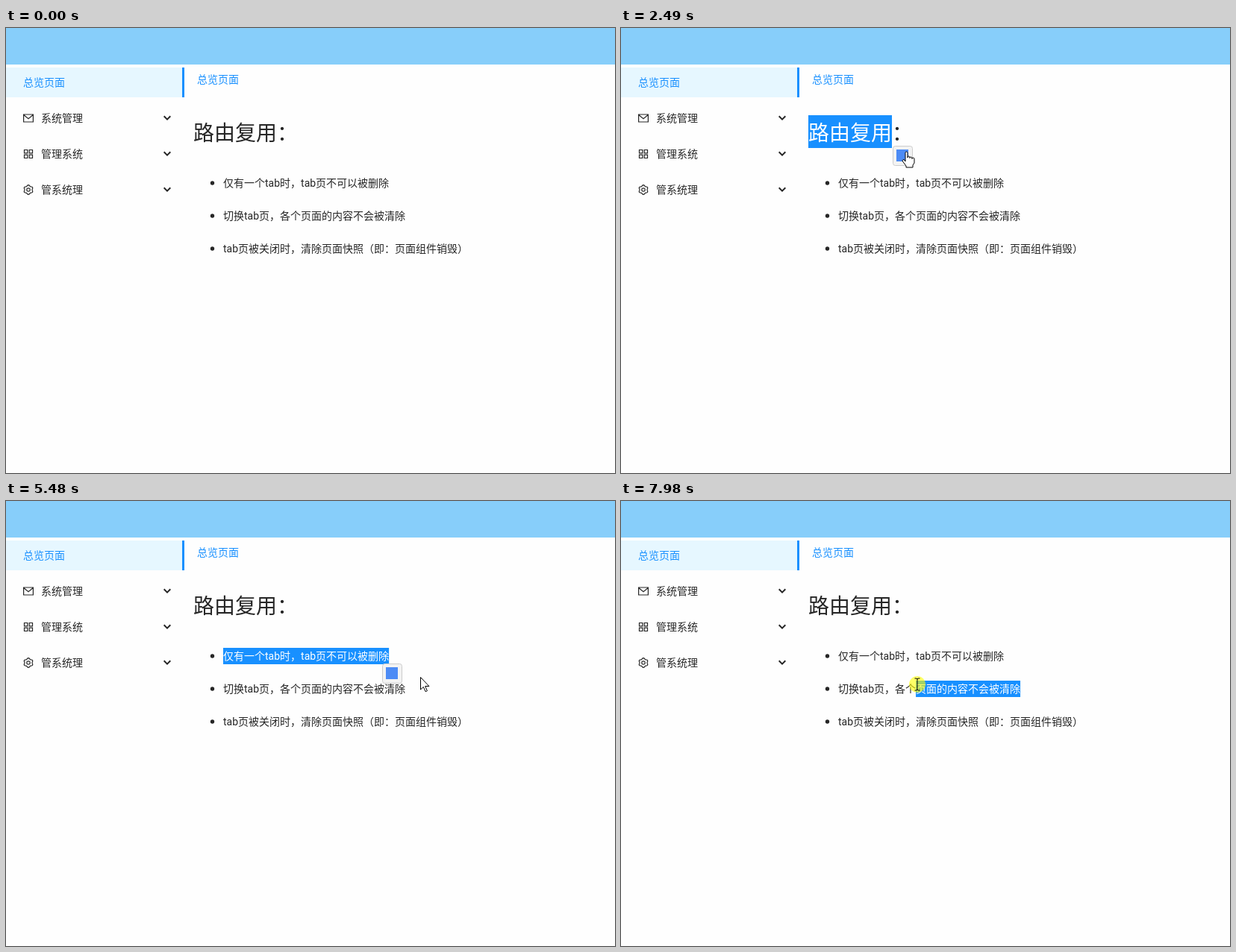
Recreate the animation shown at these times as an HTML page. Size 816x597 px, loop 8000 ms.

```html
<!DOCTYPE html>
<html lang="zh-CN">
<head>
<meta charset="utf-8">
<style>
  html, body { margin: 0; width: 100%; height: 100%; overflow: hidden; background: #fefefe; }
  svg { display: block; }
  text { font: 14px Roboto, "Noto Sans CJK SC", "Noto Sans CJK", sans-serif; fill: #262626; }
  .title { font-size: 28px; }
  .blue { fill: #1890ff; }
  .tab { font-weight: 500; }
  .white { fill: #fff; }
  .item { color: #262626; }
  .item.hover { color: #1890ff; }
  .item text { fill: currentColor; }
  .item path { fill: none; stroke: currentColor; stroke-width: 1.2; }
  .item .chevron { stroke-width: 2; }
</style>
</head>
<body>
<svg id="stage" width="816" height="597" viewBox="0 0 816 597">
  <rect width="816" height="49" fill="#87cefa"/>
  <rect y="53" width="239" height="40" fill="#e6f7ff"/>
  <rect x="236" y="53" width="3" height="40" class="blue"/>
  <text x="23" y="78" class="blue">总览页面</text>
  <text x="256" y="74" class="blue tab">总览页面</text>
  <g id="menu"></g>
  <g id="lines"></g>
  <g id="popup">
    <rect x=".5" y=".5" width="26" height="26" rx="3" fill="#f3f3f3" stroke="#ccc"/>
    <rect x="5" y="5" width="16" height="16" fill="#4c8bf5"/>
  </g>
  <circle id="ring" r="11" fill="#ff0" fill-opacity=".6"/>
  <path id="cursor" stroke="#000" stroke-linejoin="round"/>
</svg>
<script>
const $ = id => document.getElementById(id);

function gear() {
  let d = '';
  for (let i = 0; i < 48; i++) {
    const a = i * Math.PI / 24, r = 5.7 + 0.7 * Math.cos(6 * a);
    d += (i ? 'L' : 'M') + (r * Math.sin(a)).toFixed(2) + ' ' + (r * Math.cos(a)).toFixed(2);
  }
  return d + 'ZM2.2 0A2.2 2.2 0 1 1-2.2 0A2.2 2.2 0 1 1 2.2 0Z';
}

// Sidebar items
const menu = [
  ['系统管理', 121, 'M-6.4-5H6.4V5H-6.4ZM-6-4.2L0 .7L6-4.2'],
  ['管理系统', 169, 'M-5.5-5.5h4.3v4.3h-4.3ZM1.2-5.5h4.3v4.3h-4.3ZM-5.5 1.2h4.3v4.3h-4.3ZM1.2 1.2h4.3v4.3h-4.3Z'],
  ['管系统理', 217, gear()]
];
$('menu').innerHTML = menu.map(([label, y, icon]) => `
  <g class="item" transform="translate(0 ${y})">
    <path d="${icon}" transform="translate(30)"/>
    <text x="47" y="5">${label}</text>
    <path class="chevron" d="M211.7-2.7L216 1.6L220.3-2.7"/>
  </g>`).join('');
const items = [...document.querySelectorAll('.item')];

// Selectable lines: text, x, centre y, half height of the highlight
const lines = [
  ['路由复用：', 251, 139, 22],
  ['仅有一个tab时，tab页不可以被删除', 291, 208, 11],
  ['切换tab页，各个页面的内容不会被清除', 291, 252, 11],
  ['tab页被关闭时，清除页面快照（即：页面组件销毁）', 291, 296, 11]
];
$('lines').innerHTML = lines.map(([str, x, y, half], i) => {
  const text = c => `<text class="${c} ${i ? '' : 'title'}" x="${x}" y="${i ? y + 5 : 151}">${str}</text>`;
  const box = c => `<rect class="${c}" y="${y - half}" height="${half * 2}"/>`;
  return `<g>${i ? `<circle cx="276.5" cy="${y}" r="2.7" fill="#262626"/>` : ''}
    ${text('')}<clipPath id="clip${i}">${box('mark')}</clipPath>
    ${box('mark blue')}<g clip-path="url(#clip${i})">${text('white')}</g></g>`;
}).join('');
const groups = [...$('lines').children];

const ARROW = 'M.5.5V17l3.8-3.6 2.8 6.3 2.3-1-2.7-6.2h5.2Z';
const HAND = 'M-2 13V1.5Q-2 0-.5 0T1 1.5V8Q1 6 2.5 6T4 8.5Q4 7 5.5 7T7 9.5Q7 8 8.5 8T10 10V15L8 18V21H-1V19L-5.5 13Q-6.5 11-5 10.5T-2 13Z';
const BEAM = 'M-3.5-8H-1L0-7 1-8H3.5M0-7V7M-3.5 8H-1L0 7 1 8H3.5';

// Pointer path: time, x, y, shape from then on
const path = [
  [0, 760, 622, ARROW], [40, 726, 596, ARROW], [420, 205, 182, ARROW], [560, 215, 180, ARROW],
  [770, 288, 219, ARROW], [840, 288, 208, ARROW], [920, 288, 208, ARROW], [1050, 287, 206, ARROW],
  [1550, 287, 206, ARROW], [1840, 240, 143, BEAM], [1880, 244, 142, BEAM], [2240, 374, 146, BEAM],
  [2390, 374, 146, BEAM], [2490, 383, 166, HAND], [2560, 384, 168, HAND], [2620, 360, 180, ARROW],
  [2800, 294, 206, BEAM], [3060, 294, 206, BEAM], [3500, 381, 206, BEAM], [3840, 470, 206, BEAM],
  [3880, 470, 206, BEAM], [4540, 517, 208, BEAM], [5250, 517, 208, BEAM], [5300, 522, 214, ARROW],
  [5480, 555, 236, ARROW], [5830, 555, 236, ARROW], [5900, 556, 248, ARROW], [6000, 556, 248, ARROW],
  [6580, 300, 76, HAND], [6630, 295, 66, HAND], [6650, 295, 66, HAND], [6720, 316, 82, ARROW],
  [7400, 525, 248, BEAM], [7480, 545, 258, BEAM], [7980, 397, 246, BEAM], [8000, 397, 246, BEAM]
];

// Text selections: line, press, release, cleared, anchor at line end, popup place
const drags = [
  { line: 0, press: 1880, release: 2300, clear: 3060, popup: [364, 158] },
  { line: 1, press: 3060, release: 4970, clear: 5900, popup: [504, 218] },
  { line: 2, press: 7480, release: 8000, clear: 8000, fromEnd: true }
];
const presses = [...drags.map(d => [d.press, d.release]), [5900, 5980]];

function pointer(t) {
  const i = Math.max(1, path.findIndex(k => k[0] > t));
  const [t0, x0, y0, shape] = path[i - 1], [t1, x1, y1] = path[i];
  const k = (t - t0) / (t1 - t0);
  return { x: x0 + (x1 - x0) * k, y: y0 + (y1 - y0) * k, shape };
}

// Nearest character edge to x
function snap(text, x) {
  const n = text.getNumberOfChars();
  let best = text.getStartPositionOfChar(0).x;
  for (let i = 0; i < n; i++) {
    const edge = text.getEndPositionOfChar(i).x;
    if (Math.abs(edge - x) < Math.abs(best - x)) best = edge;
  }
  return best;
}

function draw(now) {
  const t = now % 8000, p = pointer(t);
  const over = p.x < 239 ? menu.findIndex(m => Math.abs(p.y - m[1]) <= 20) : -1;
  items.forEach((item, i) => item.classList.toggle('hover', i === over));

  const drag = drags.find(d => t >= d.press && t < d.clear);
  groups.forEach((group, i) => {
    let x = 0, width = 0;
    if (drag && drag.line === i) {
      const text = group.querySelector('text');
      const a = snap(text, drag.fromEnd ? 816 : 0);
      const b = snap(text, pointer(Math.min(t, drag.release - 1)).x);
      x = Math.min(a, b);
      width = Math.abs(b - a);
    }
    group.querySelectorAll('.mark').forEach(r => {
      r.setAttribute('x', x);
      r.setAttribute('width', width);
    });
  });

  const popup = drag && drag.popup && t >= drag.release;
  $('popup').style.display = popup ? '' : 'none';
  if (popup) $('popup').setAttribute('transform', `translate(${drag.popup})`);

  const at = `translate(${Math.round(p.x)} ${Math.round(p.y)})`;
  const pressed = presses.some(([a, b]) => t >= a && t < b);
  $('ring').style.display = pressed ? '' : 'none';
  $('ring').setAttribute('transform', at);
  const shape = over < 0 ? p.shape : HAND;
  $('cursor').setAttribute('d', shape);
  $('cursor').setAttribute('fill', shape === BEAM ? 'none' : '#fff');
  $('cursor').setAttribute('transform', at);
}

const start = performance.now();
function tick() {
  draw(performance.now() - start);
  requestAnimationFrame(tick);
}
tick();
</script>
</body>
</html>
```
